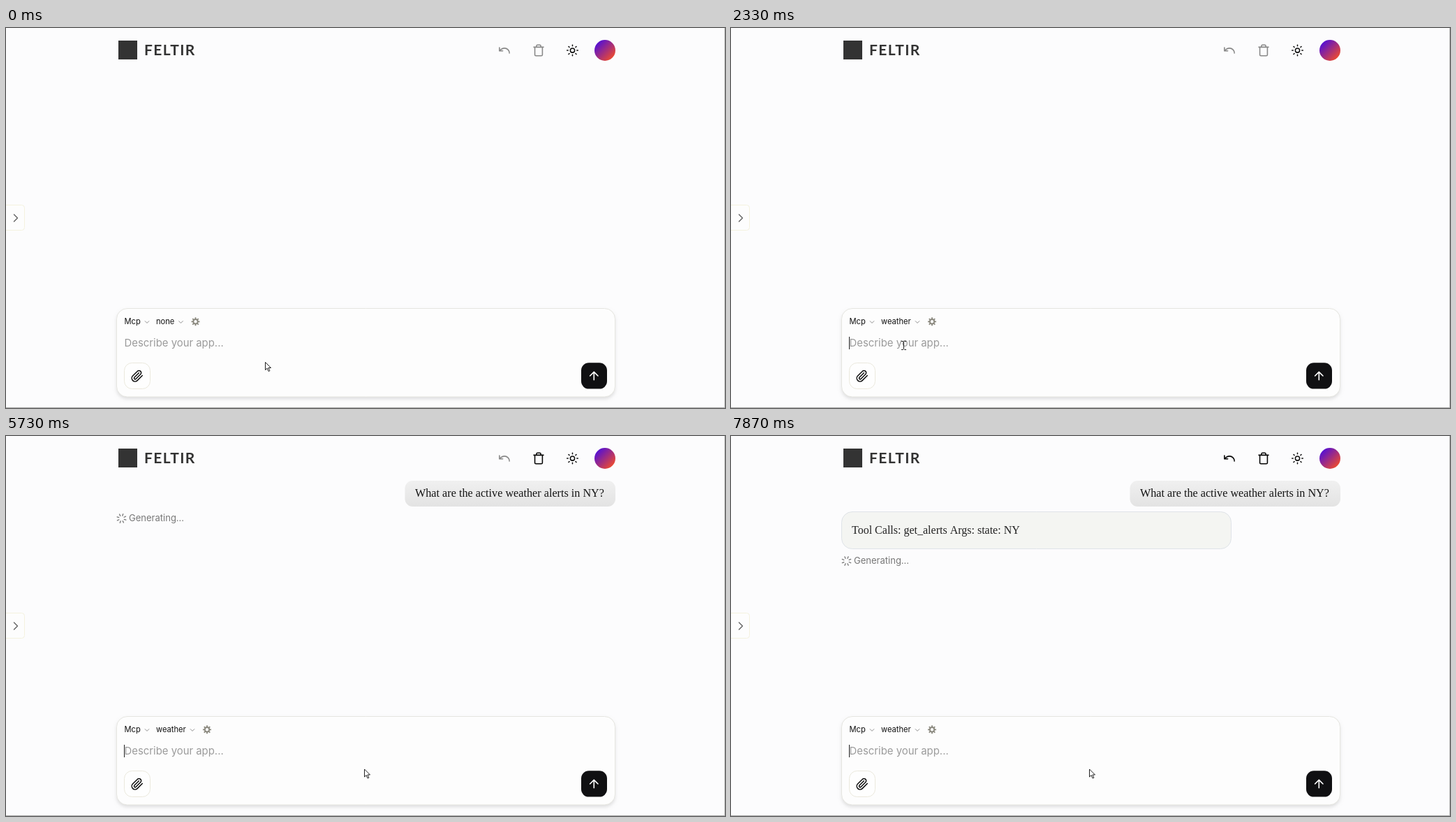
An HTML page with a canvas that plays this animation: 1030 by 544 pixels, repeating every 8000 ms.

```html
<!DOCTYPE html>
<html lang="en">
<head>
<meta charset="utf-8">
<title>Chat prompt</title>
<style>
  html, body { margin: 0; width: 100%; height: 100%; overflow: hidden; background: #fcfcfd; }
  canvas { display: block; }
</style>
</head>
<body>
<canvas id="stage" width="1030" height="544"></canvas>
<script>
const ctx = document.getElementById('stage').getContext('2d');
const LOOP = 8000;
const QUESTION = 'What are the active weather alerts in NY?';
const MENU_ITEMS = ['none', 'time', 'files', 'search', 'weather'];
const ROW = 29.8;
const SANS = 'Inter, sans-serif';
const SERIF = '"Liberation Serif", serif';

// Moments at which the interface changes, in ms
const AT = { open: 1000, pick: 1930, beam: 2130, focus: 2330, paste: 2800, leave: 3270, send: 4200, tool: 7530 };

// Pointer path: time, x, y
const POINTER = [
  [267, 371, 478], [667, 192, 407], [800, 192, 407], [933, 225, 414],
  [1267, 225, 414], [1600, 241, 389], [2000, 241, 389], [2133, 247, 455],
  [3200, 247, 455], [3400, 513, 476.5]
];

// Icons on a 24 unit grid
const ICON = {
  undo: 'M3 7v6h6M21 17a9 9 0 0 0-9-9 9 9 0 0 0-6 2.3L3 13',
  trash: 'M3 6h18M19 6v14c0 1-1 2-2 2H7c-1 0-2-1-2-2V6M8 6V4c0-1 1-2 2-2h4c1 0 2 1 2 2v2',
  clip: 'm21.4 11-9.2 9.2a6 6 0 0 1-8.5-8.5l8.6-8.5A4 4 0 1 1 18 8.8l-8.6 8.6a2 2 0 0 1-2.8-2.8l8.5-8.5',
  up: 'm5 12 7-7 7 7M12 19V5',
  down: 'm6 9 6 6 6-6',
  right: 'm9 18 6-6-6-6',
  check: 'M20 6 9 17l-5-5',
  circle: 'M16 12a4 4 0 1 1-8 0 4 4 0 1 1 8 0'
};

const clamp = v => Math.max(0, Math.min(1, v));
const mix = (a, b, k) => a + (b - a) * k;
const grey = v => `rgb(${v},${v},${v})`;

function text(str, x, y, size, color, family = SANS, weight = 400) {
  ctx.font = `${weight} ${size}px ${family}`;
  ctx.fillStyle = color;
  ctx.fillText(str, x, y);
}

function box(x, y, w, h, r, fill, border) {
  ctx.beginPath();
  ctx.roundRect(x, y, w, h, r);
  ctx.fillStyle = fill;
  ctx.fill();
  if (!border) return;
  ctx.strokeStyle = border;
  ctx.lineWidth = 1;
  ctx.stroke();
}

function raisedBox(...args) {
  ctx.save();
  ctx.shadowColor = 'rgba(0,0,0,0.12)';
  ctx.shadowBlur = 5;
  ctx.shadowOffsetY = 3;
  box(...args.slice(0, 6));
  ctx.restore();
  box(...args);
}

function icon(path, cx, cy, size, color, lineWidth = 2) {
  ctx.save();
  ctx.translate(cx, cy);
  ctx.scale(size / 24, size / 24);
  ctx.translate(-12, -12);
  ctx.strokeStyle = color;
  ctx.lineWidth = lineWidth;
  ctx.lineCap = ctx.lineJoin = 'round';
  ctx.stroke(new Path2D(path));
  ctx.restore();
}

function spokes(cx, cy, inner, outer, width, color, turn = 0, cap = 'round') {
  ctx.beginPath();
  for (let i = 0; i < 8; i++) {
    const a = turn + i * Math.PI / 4, c = Math.cos(a), s = Math.sin(a);
    ctx.moveTo(cx + c * inner, cy + s * inner);
    ctx.lineTo(cx + c * outer, cy + s * outer);
  }
  ctx.strokeStyle = color;
  ctx.lineWidth = width;
  ctx.lineCap = cap;
  ctx.stroke();
}

function gear(cx, cy) {
  spokes(cx, cy, 3, 6, 1.8, '#8b897f', 0, 'butt');
  ctx.beginPath();
  ctx.arc(cx, cy, 3.2, 0, Math.PI * 2);
  ctx.lineWidth = 2;
  ctx.stroke();
}

function pointerAt(t) {
  const next = POINTER.findIndex(p => p[0] > t);
  if (next === 0) return POINTER[0].slice(1);
  if (next < 0) return POINTER[POINTER.length - 1].slice(1);
  const a = POINTER[next - 1], b = POINTER[next];
  const k = (t - a[0]) / (b[0] - a[0]);
  return [mix(a[1], b[1], k), mix(a[2], b[2], k)];
}

function drawPointer(t, [x, y]) {
  ctx.save();
  ctx.translate(x, y);
  ctx.lineWidth = 1;
  ctx.lineCap = 'butt';
  ctx.strokeStyle = '#222';
  if (t >= AT.beam && t < AT.leave) {
    ctx.stroke(new Path2D('M-3 -6.5h2.5l1 1 1-1h2.5M-3 5.5h2.5l1-1 1 1h2.5M.5 -5.5v10'));
  } else {
    const arrow = new Path2D('M.5 .5v11l2.6-2.4 2 4.4 1.8-.8-2-4.2h3.6z');
    ctx.fillStyle = '#fff';
    ctx.fill(arrow);
    ctx.stroke(arrow);
  }
  ctx.restore();
}

function drawHeader(t) {
  box(161, 18, 27, 27, 0, '#333');
  ctx.letterSpacing = '1.4px';
  text('FELTIR', 198, 39, 21, '#333', 'Lato, sans-serif', 700);
  ctx.letterSpacing = '0px';

  const enabled = start => grey(Math.round(mix(136, 5, clamp((t - start) / 200))));
  icon(ICON.undo, 714, 32, 19, enabled(AT.tool));
  icon(ICON.trash, 763, 32, 18.6, enabled(AT.send));
  icon(ICON.circle, 811.5, 32, 18.6, '#111');
  spokes(811.5, 32, 6.3, 7.8, 1.55, '#111');

  const glow = ctx.createLinearGradient(847, 21, 869, 43);
  glow.addColorStop(0, '#5410d4');
  glow.addColorStop(1, '#ec4a30');
  box(843, 17, 30, 30, 15, glow);
}

function drawSideTab() {
  box(-6, 253.5, 32.5, 36, 4, '#fdfdfd', '#f4f2df');
  icon(ICON.right, 14, 272, 20, '#666', 1.7);
}

function drawComposer(t) {
  raisedBox(158.5, 401.5, 714, 126.5, 15, '#fdfdfd', '#e6e6e1');

  const picked = t >= AT.pick;
  text('Mcp', 169.5, 424.4, 11.17, '#111');
  icon(ICON.down, 202, 421, 11.2, '#888');
  text(picked ? 'weather' : 'none', 215, 424.4, 11.17, '#111');
  icon(ICON.down, picked ? 267 : 250.5, 421, 11.2, '#888');
  gear(picked ? 288 : 271.5, 420.3);

  const filled = t >= AT.paste && t < AT.send;
  text(filled ? QUESTION : 'Describe your app...', 169.5, 456.3, 14.9, filled ? '#111' : '#9b9b9b');
  if (caretVisible(t)) {
    const x = filled ? Math.round(169 + ctx.measureText(QUESTION).width) : 169.5;
    ctx.fillStyle = '#222';
    ctx.fillRect(Math.floor(x), 442, 1, 18);
  }

  box(169.5, 479.5, 37, 37, 11, '#fefefe', '#ebe9dd');
  icon(ICON.clip, 188, 498.3, 18.6, '#111');
  box(824, 479.3, 37, 37.3, 11, '#101012');
  icon(ICON.up, 842.3, 498, 19.5, '#fff');
}

function caretVisible(t) {
  if (t < AT.focus) return false;
  if (t < 3330) return true;
  if (t < 3870) return false;
  return t < 4410 || (t - 4410) % 1060 < 530;
}

function drawMenu(t, pointerY) {
  if (t < AT.open || t >= AT.pick) return;
  ctx.save();
  ctx.globalAlpha = clamp((t - 930) / 200);
  raisedBox(215.5, 218.5, 119, 186.5, 5.5, '#fff', '#e4e4e6');
  text('Server', 250, 242, 13, '#111', SANS, 600);
  const active = pointerY < 401 ? MENU_ITEMS.length - 1 : 0;
  MENU_ITEMS.forEach((name, i) => {
    const top = 252 + i * ROW;
    if (i === active) box(220, top, 110, ROW, 3, '#f3f3f4');
    text(name, 250, top + 19.6, 13, '#111');
  });
  icon(ICON.check, 234.5, 252 + ROW / 2, 14.9, '#111');
  ctx.restore();
}

function drawChat(t) {
  if (t < AT.send) return;
  const shade = ctx.createLinearGradient(0, 64, 0, 101);
  shade.addColorStop(0, '#f0f0f0');
  shade.addColorStop(1, '#e3e3e3');
  box(571.5, 64, 301.5, 37, 11, shade);
  text(QUESTION, 586, 87, 16.2, '#151515', SERIF);

  let y = 118;
  if (t >= AT.tool) {
    box(158.5, 108.5, 558, 53, 15, '#f4f5f2', '#dfe3e8');
    text('Tool Calls: get_alerts Args: state: NY', 173, 140, 16, '#222', SERIF);
    y += 61;
  }
  spokes(165.5, y, 4, 6.7, 1.3, '#777', (t - 4305) / 1000 * Math.PI * 2);
  text('Generating...', 176, y + 4.3, 13.03, '#777');
}

function draw(t) {
  ctx.fillStyle = '#fcfcfd';
  ctx.fillRect(0, 0, 1030, 544);
  const pointer = pointerAt(t);
  drawHeader(t);
  drawSideTab();
  drawChat(t);
  drawComposer(t);
  drawMenu(t, pointer[1]);
  ctx.fillStyle = '#bdbdbd';
  ctx.fillRect(1029, 0, 1, 544);
  ctx.fillStyle = '#a9a9a9';
  ctx.fillRect(0, 543, 1030, 1);
  drawPointer(t, pointer);
}

// The screen refreshes 15 times a second
const start = performance.now();
function tick() {
  const t = Math.max(0, performance.now() - start) % LOOP;
  draw(Math.floor((t + 4) * 0.015) / 0.015);
  requestAnimationFrame(tick);
}
tick();
</script>
</body>
</html>
```
